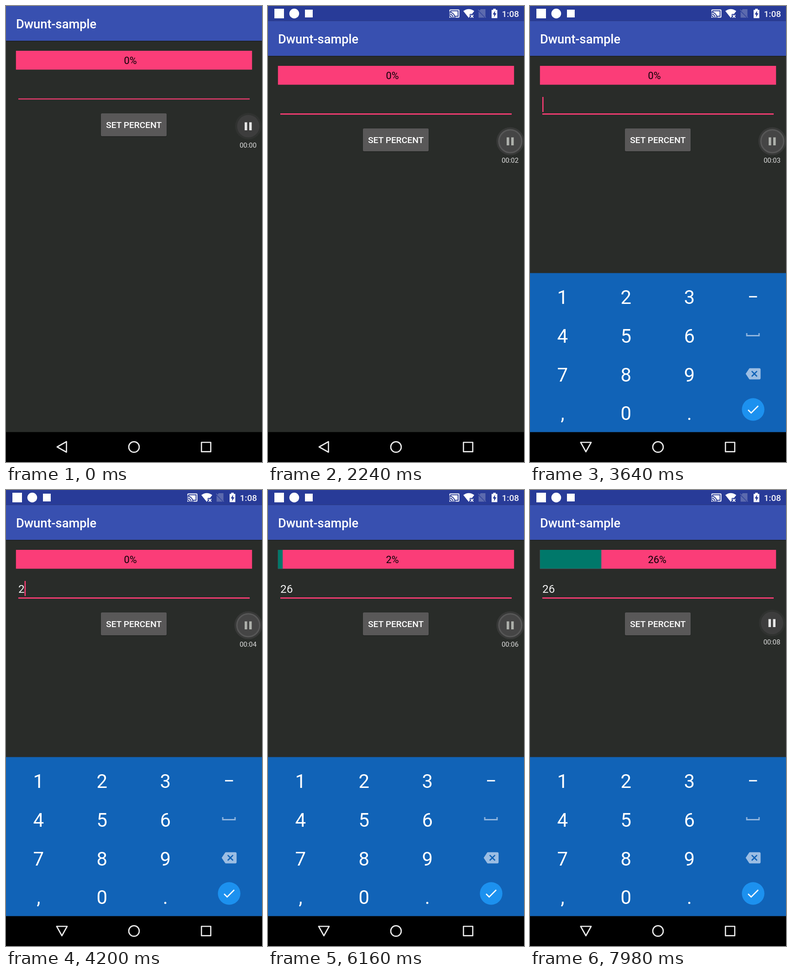
An HTML page for the animation above (8 s loop, 561 by 998 pixels).

```html
<!DOCTYPE html>
<html lang="en">
<head>
<meta charset="utf-8">
<title>Percent bar</title>
<style>
  html, body { margin: 0; width: 100%; height: 100%; overflow: hidden; background: #000; }
  svg { display: block; width: 100%; height: 100%; font-family: Roboto, sans-serif; fill: #fff; }
  .medium { font-weight: 500; }
  .line { fill: none; stroke: #e9e9e9; stroke-width: 2.7; stroke-linejoin: round; }
  .keys { font-size: 42px; text-anchor: middle; }
</style>
</head>
<body>
<svg viewBox="0 0 561 998">
  <rect width="561" height="998" fill="#292c29"/>

  <g id="app">
    <rect y="109" width="561" height="2" fill="#000" opacity=".25"/>
    <rect y="32.700" width="561" height="76.400" fill="#3850b0"/>
    <text class="medium" x="22" y="82" font-size="27.3">Dwunt-sample</text>

    <rect x="21.800" y="131" width="517.400" height="41.300" fill="#fb3d78"/>
    <rect id="fill" x="21.800" y="131" height="41.300" fill="#00786a"/>
    <text id="percent" x="258.500" y="160" font-size="21.8" fill="#0a0005"></text>

    <text id="entry" x="27" y="225" font-size="24.5" fill="#f2f2f2"></text>
    <rect id="caret" y="199" width="2.6" height="33" fill="#f93c74"/>
    <rect id="underline" x="27" y="235" width="507" height="2.800" fill="#f93c74"/>

    <rect x="207.500" y="269" width="145" height="50.500" rx="3" fill="#000" opacity=".2"/>
    <rect x="208" y="268" width="144" height="50" rx="2.5" fill="#595858"/>
    <text class="medium" x="280.200" y="300" font-size="19.2" text-anchor="middle">SET PERCENT</text>

    <g id="recorder">
      <g id="idle">
        <circle cx="531" cy="296" r="29" fill="#303230"/>
        <circle cx="531" cy="296" r="24.500" fill="#3d3d3d"/>
      </g>
      <g id="active">
        <circle cx="531" cy="296" r="30.500" fill="#383938"/>
        <circle cx="531" cy="296" r="25" fill="#454545" stroke="#575757" stroke-width="3"/>
      </g>
      <path id="pause" d="M523 287.500h5.500v17.500h-5.500zM533 287.500h5.500v17.500h-5.500z"/>
      <text id="clock" x="512" y="342.700" font-size="14.9" fill="#dedede"></text>
    </g>
  </g>

  <g id="status">
    <rect width="561" height="32.700" fill="#283b98"/>
    <rect x="14" y="6" width="21" height="21"/>
    <circle cx="57.500" cy="16.500" r="10.700"/>
    <rect x="81" y="8" width="17" height="17"/>
    <path transform="translate(396.500 4.500)" d="M1 18v3h3c0-1.660-1.340-3-3-3zm0-4v2c2.760 0 5 2.240 5 5h2c0-3.870-3.130-7-7-7zm18-7H5v1.630c3.960 1.280 7.090 4.410 8.370 8.370H19V7zM1 10v2c4.970 0 9 4.030 9 9h2c0-6.080-4.930-11-11-11zm20-7H3c-1.100 0-2 .9-2 2v3h2V5h18v14h-7v2h7c1.100 0 2-.9 2-2V5c0-1.100-.9-2-2-2z"/>
    <path d="M428 11q12-8.500 24 0l-5 6.500h-5v5.500l-2 3z"/>
    <path d="M444 19.500l6 6m0-6l-6 6" stroke="#fff" stroke-width="1.800"/>
    <path d="M466 7h10.500v16.500l-13-13zM461.500 12l13.500 13.500h-13.500z" fill="#5c6aae"/>
    <path d="M460.500 8l17 17.500" stroke="#5c6aae" stroke-width="1.700"/>
    <path d="M490 8.500h3.500v-2.500h5.500v2.500h3.500v18h-12.500z"/>
    <path d="M497.500 10.500v5.500h3l-5 8.500v-6h-3z" fill="#283b98"/>
    <text class="medium" x="512.500" y="24" font-size="19.1" fill="#f4f4f8">1:08</text>
  </g>

  <rect y="932.500" width="561" height="65.500" fill="#000"/>
  <g id="pad">
    <rect y="584.500" width="561" height="348" fill="#1163b7"/>
    <g id="keys" class="keys"></g>
    <rect x="480" y="634.800" width="17.500" height="3"/>
    <path d="M475 716v5.500h27v-5.500" fill="none" stroke="#8fb5de" stroke-width="2.800"/>
    <path fill="#9bbde3" transform="translate(472.600 788.600) scale(1.364)" d="M22 3H7c-.69 0-1.230.35-1.590.88L0 12l5.410 8.110c.36.53.9.89 1.590.89h15c1.100 0 2-.9 2-2V5c0-1.100-.9-2-2-2zm-3 12.590L17.590 17 14 13.410 10.410 17 9 15.590 12.590 12 9 8.410 10.410 7 14 10.590 17.590 7 19 8.410 15.410 12z"/>
    <circle cx="489" cy="883" r="24.700" fill="#1c91ef"/>
    <path transform="translate(472.400 866.600) scale(1.364)" d="M9 16.200L4.800 12l-1.400 1.400L9 19 21 7l-1.400-1.400z"/>
  </g>
  <g class="line">
    <path id="back" d="M-11.500-10h23l-11.500 20.500z"/>
    <circle cx="280.500" cy="965.200" r="11.500"/>
    <rect x="428.300" y="955" width="20.400" height="20.400"/>
  </g>
</svg>
<script>
const LOOP = 8000, STEP = 140;
const $ = id => document.getElementById(id);
const set = (id, attrs) => {
  for (const name in attrs) $(id).setAttribute(name, attrs[name]);
};
const show = (id, on) => set(id, { visibility: on ? 'visible' : 'hidden' });
const clamp = v => Math.max(0, Math.min(1, v));
const passed = (times, t) => times.filter(at => t >= at).length;

const SECONDS = [700, 1680, 2660, 4060, 4900, 5880, 7000, 7840];
const BLINKS = [840, 1260, 1680, 2240, 2380, 3220, 3640, 4060, 4200,
  5180, 5320, 5880, 6300, 7000, 7280, 7840];

['123', '456', '789', ',0.'].forEach((row, r) => {
  [...row].forEach((key, c) => {
    const label = document.createElementNS('http://www.w3.org/2000/svg', 'text');
    label.setAttribute('x', 71.4 + 139 * c);
    label.setAttribute('y', 651.7 + 84.9 * r);
    label.textContent = key;
    $('keys').append(label);
  });
});

function draw(time) {
  const t = Math.floor((time % LOOP) / STEP) * STEP;

  // Leaving full screen: the layout drops below the status bar.
  set('app', { transform: `translate(0 ${t < STEP ? -33 : 0})` });
  set('status', { transform: `translate(0 ${-33 * (1 - clamp(t / 280))})` });
  set('underline', { opacity: 0.8 + 0.2 * clamp(t / 420) });

  // Typed value and caret
  const entry = '26'.slice(0, passed([4200, 4900], t));
  $('entry').textContent = entry;
  set('caret', { x: 27 + 13.6 * entry.length });
  show('caret', passed(BLINKS, t) % 2);

  // Progress
  const percent = Math.round(26 * clamp((t - 6090) / 770));
  set('fill', { width: 517.4 * percent / 100 });
  $('percent').textContent = percent + '%';

  // Floating recorder button
  const active = t >= 1680 && t < 7980;
  show('active', active);
  show('idle', !active);
  set('pause', { fill: active ? '#adb0ab' : '#e6e6e6' });
  set('recorder', { transform: t >= 7980 ? 'translate(-.5 -5)' : '' });
  $('clock').textContent = '00:0' + passed(SECONDS, t);

  // Keypad slides up quickly while fading in
  const left = 1 - clamp((t - 2260) / 240);
  set('pad', {
    transform: `translate(0 ${50 * left * left})`,
    opacity: left === 1 ? 0 : 1 - 0.3 * left * left
  });
  set('back', { transform: `translate(122.5 965) rotate(${left === 1 ? 90 : 0})` });
}

const start = performance.now();
function tick() {
  draw(performance.now() - start);
  requestAnimationFrame(tick);
}
tick();
</script>
</body>
</html>
```
